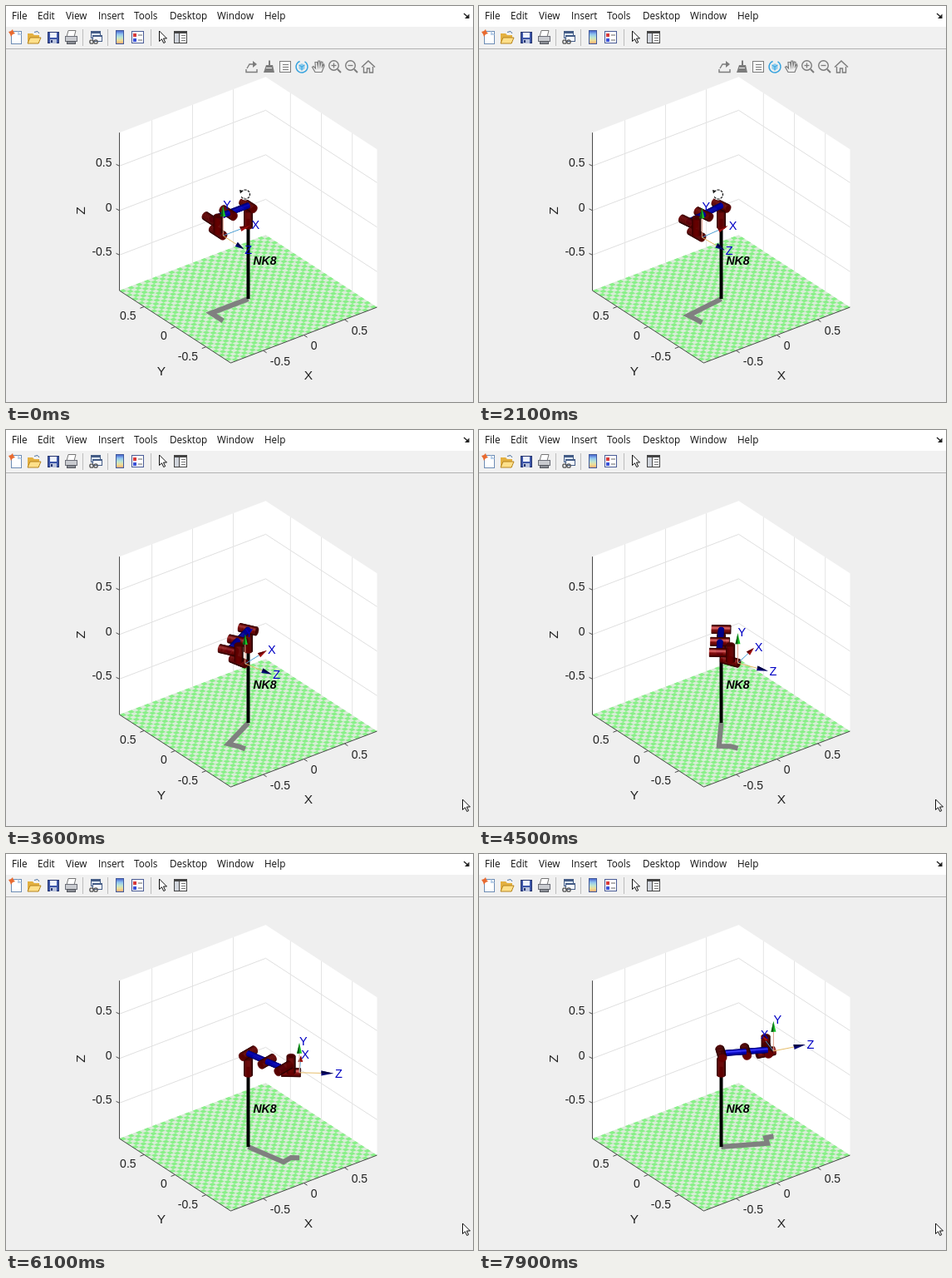
Write an HTML page with a canvas that moves like this. It is 562x476 px and loops after 8000 ms.

```html
<!DOCTYPE html>
<html lang="en">
<head>
<meta charset="utf-8">
<title>Robot arm plot</title>
<style>
html, body { margin: 0; width: 100%; height: 100%; overflow: hidden; background: #efefef; }
canvas { display: block; }
</style>
</head>
<body>
<canvas id="stage" width="562" height="476"></canvas>
<script>
const W = 562, H = 476, LOOP = 8000, STEP = 100;
const RAD = Math.PI / 180;
const SANS = '"Liberation Sans", Arial, sans-serif';
const UI = '"Open Sans", "Noto Sans", sans-serif';
const FLOOR = -0.9, TOP = 0.875, EDGE = 0.9;
const view = document.getElementById('stage').getContext('2d');
const still = document.createElement('canvas');
still.width = W;
still.height = H;
let g = still.getContext('2d');

// ---------- vectors and projection ----------
const project = ([x, y, z]) => [291.5 + 97.8 * x - 74.4 * y, 255.8 - 37.2 * x - 48.3 * y - 107 * z];
const add = (a, b, k = 1) => a.map((v, i) => v + b[i] * k);
const dot = (a, b) => a[0] * b[0] + a[1] * b[1] + a[2] * b[2];
const cross = (a, b) => [a[1] * b[2] - a[2] * b[1], a[2] * b[0] - a[0] * b[2], a[0] * b[1] - a[1] * b[0]];
const unit = a => a.map(v => v / Math.hypot(...a));
const heading = deg => [Math.cos(deg * RAD), Math.sin(deg * RAD), 0];
const UP = [0, 0, 1];
const EYE = unit([-0.531, -0.698, 0.48]);
const GLINT = unit([-0.43, -0.56, 0.74]);

// ---------- drawing helpers ----------
function trace(pts, close) {
  g.beginPath();
  pts.forEach(p => g.lineTo(p[0], p[1]));
  if (close) g.closePath();
}
function fill(pts, color) {
  trace(pts, true);
  g.fillStyle = color;
  g.fill();
}
function line(pts, color, width = 1) {
  trace(pts);
  g.strokeStyle = color;
  g.lineWidth = width;
  g.stroke();
}
function rect(x, y, w, h, color, edge) {
  g.fillStyle = color;
  g.fillRect(x, y, w, h);
  if (edge) {
    g.strokeStyle = edge;
    g.lineWidth = 1;
    g.strokeRect(x + 0.5, y + 0.5, w - 1, h - 1);
  }
}
function arc(x, y, r, color, width = 1, from = 0, to = 360) {
  g.beginPath();
  g.arc(x, y, r, from * RAD, to * RAD);
  g.strokeStyle = color;
  g.lineWidth = width;
  g.stroke();
}
function text(s, x, y, font, color = '#222', align = 'left') {
  g.font = font;
  g.fillStyle = color;
  g.textAlign = align;
  g.textBaseline = 'middle';
  g.fillText(s, x, y);
}
const line3 = (pts, color, width) => line(pts.map(project), color, width);
const fill3 = (pts, color) => fill(pts.map(project), color);

function pointer(x, y) {
  const shape = [[0, 0], [0, 12.5], [3, 9.8], [5.2, 14.5], [7.2, 13.6], [5, 9], [9, 9]];
  const pts = shape.map(p => [x + 0.5 + p[0], y + p[1]]);
  fill(pts, '#fff');
  trace(pts, true);
  g.strokeStyle = '#111';
  g.lineWidth = 1;
  g.stroke();
}

// ---------- window chrome ----------
function menuBar() {
  rect(0, 0, W, 25, '#fff');
  const items = { File: 7, Edit: 38, View: 72, Insert: 111, Tools: 154, Desktop: 197, Window: 254, Help: 311 };
  for (const name in items) text(name, items[name], 13, '11.7px ' + UI, '#111');
  line([[551, 9], [556, 13.5]], '#222', 1.4);
  fill([[557.5, 9.5], [557.5, 15], [552, 15]], '#222');
}

function toolBar() {
  rect(0, 25, W, 26, '#f1f1f1');
  rect(0, 51, W, 1, '#b2b2b2');
  for (const x of [92, 122, 174]) rect(x, 28, 1, 20, '#bdbdbd');
  // new
  rect(6, 30, 13, 16, '#fdfeff', '#6d8cb4');
  fill([[14, 30], [19, 35], [14, 35]], '#b9cfe8');
  fill([[3, 31], [6, 30], [8, 28], [9, 31], [11, 33], [8, 34], [6, 37], [5, 34]], '#e86a30');
  // open
  fill([[26, 33], [32, 33], [34, 35], [40, 35], [40, 45], [26, 45]], '#e3b040');
  fill([[29, 38], [42, 38], [39, 45], [26, 45]], '#ffe08a');
  line([[26, 45], [29, 38], [42, 38], [39, 45], [26, 45]], '#b58420');
  line([[34, 31.5], [38, 30.5], [40, 33]], '#4a6fa0');
  // save
  rect(50, 31, 14, 14, '#3d56a8', '#26356f');
  rect(53, 32, 8, 6, '#eef3ff');
  rect(53, 40, 8, 5, '#b9c3dd');
  rect(54, 41, 2, 3, '#26356f');
  // print
  fill([[75, 29], [84, 29], [82, 37], [73, 37]], '#fff');
  line([[73, 37], [75, 29.5], [84, 29.5], [82, 37]], '#777');
  rect(71, 36, 15, 7, '#c9cbd0', '#6c6f78');
  rect(73, 42, 11, 4, '#8b8e96', '#55585f');
  // link
  rect(102, 30, 12, 9, '#dfe9f7', '#445c86');
  rect(102, 30, 12, 3, '#445c86');
  rect(104, 35, 12, 8, '#f5f8fd', '#445c86');
  rect(104, 35, 12, 2, '#445c86');
  arc(103, 43, 2.2, '#555', 1.3);
  arc(108, 43, 2.2, '#555', 1.3);
  // colour bar
  const ramp = g.createLinearGradient(0, 30, 0, 46);
  ['#4a68d0', '#8fc4f0', '#bfe6d0', '#f4dc90', '#e89a70'].forEach((c, i) => ramp.addColorStop(i / 4, c));
  rect(132, 29, 10, 17, ramp, '#41599a');
  // legend
  rect(151, 30, 15, 15, '#fff', '#4a5c96');
  rect(153, 33, 4, 4, '#d83a3a');
  rect(153, 39, 4, 4, '#3a52d8');
  line([[159, 35], [164, 35]], '#666');
  line([[159, 41], [164, 41]], '#666');
  pointer(184, 30);
  // inspector
  rect(202, 30, 16, 15, '#fff', '#444');
  rect(202, 30, 16, 3, '#444');
  rect(203, 33, 5, 11, '#d0d4dc');
  rect(208, 33, 1, 12, '#444');
  for (const y of [35, 38, 41]) rect(211, y, 5, 1, '#777');
}

// ---------- plot box ----------
function plotBox() {
  const E = EDGE, ticks = [-0.5, 0, 0.5];
  fill3([[-E, E, FLOOR], [-E, E, TOP], [E, E, TOP], [E, -E, TOP], [E, -E, FLOOR], [E, E, FLOOR]], '#fff');
  for (const v of ticks) {
    line3([[-E, E, v], [E, E, v], [E, -E, v]], '#e0e0e0');
    line3([[v, E, FLOOR], [v, E, TOP]], '#e4e4e4');
    line3([[E, v, FLOOR], [E, v, TOP]], '#e4e4e4');
  }
  fill3([[-E, -E, FLOOR], [E, -E, FLOOR], [E, E, FLOOR], [-E, E, FLOOR]], '#daecd8');
  const n = 36, s = 2 * E / n;
  for (let i = 0; i < n; i++) {
    for (let j = 1 - i % 2; j < n; j += 2) {
      const x = -E + i * s, y = -E + j * s;
      fill3([[x, y, FLOOR], [x + s, y, FLOOR], [x + s, y + s, FLOOR], [x, y + s, FLOOR]], '#88f088');
    }
  }
  line3([[-E, E, TOP], [-E, E, FLOOR], [-E, -E, FLOOR], [E, -E, FLOOR]], '#4a4a4a');
  const font = '14px ' + SANS;
  for (const v of ticks) {
    line3([[v, -E, FLOOR], [v, -E - 0.055, FLOOR]], '#4a4a4a');
    line3([[-E, v, FLOOR], [-E - 0.05, v, FLOOR]], '#4a4a4a');
    const z = project([-E, E, v]);
    line([z, [z[0] - 4, z[1] - 2]], '#4a4a4a');
    text(v, z[0] - 9, z[1] - 3, font, '#222', 'right');
    const x = project([v, -E, FLOOR]), y = project([-E, v, FLOOR]);
    text(v, x[0] + 8.3, x[1] + 14, font);
    text(v, y[0] - 9.7, y[1] + 12, font, '#222', 'right');
  }
  text('X', 364, 444.5, '15.5px ' + SANS, '#222', 'center');
  text('Y', 187, 440, '15.5px ' + SANS, '#222', 'center');
  g.save();
  g.translate(90.5, 246);
  g.rotate(-Math.PI / 2);
  text('Z', 0, 0, '15.5px ' + SANS, '#222', 'center');
  g.restore();
}

// ---------- hover tools of the axes ----------
function axesTools(alpha) {
  if (alpha <= 0) return;
  const c = '#7c7c7c', y = 73;
  g.save();
  g.globalAlpha = alpha;
  line([[289, 76], [289, 79.5], [302, 79.5], [302, 76]], c, 1.4);
  line([[290, 75], [293, 70], [298, 70]], c, 1.4);
  fill([[297, 66], [302, 70], [297, 74]], c);
  line([[317, 65.5], [317, 71]], c, 2);
  fill([[313, 71], [321, 71], [323, 80], [310, 80]], c);
  rect(313, 74, 7, 1, '#efefef');
  rect(329, 66, 14, 14, '#f6f6f6', c);
  for (const k of [70, 73, 76]) rect(333, k, 7, 1, c);
  arc(356, y, 7, '#35a2de', 1.5, -60, 250);
  fill([[352.5, 71], [356, 69], [359.5, 71], [359.5, 75.5], [356, 77.5], [352.5, 75.5]], '#8cccee');
  line([[352.5, 71], [356, 73], [359.5, 71]], '#35a2de');
  line([[356, 73], [356, 77.5]], '#35a2de');
  trace([[372, 79.5], [368.5, 73.5], [370, 72.5], [372.5, 75], [372, 67.5], [374.5, 67.5], [375.3, 72],
    [375.8, 66], [377.6, 66], [378, 72], [379.2, 67], [381, 67.5], [380.5, 73], [382.5, 70], [383, 72], [380, 79.5]], true);
  g.strokeStyle = c;
  g.lineWidth = 1.2;
  g.stroke();
  for (const x of [394.5, 414.5]) {
    arc(x, 71.5, 5.8, c, 1.4);
    line([[x + 4.5, 76], [x + 8.5, 80]], c, 2);
    line([[x - 3, 71.5], [x + 3, 71.5]], c, 1.3);
  }
  line([[394.5, 68.5], [394.5, 74.5]], c, 1.3);
  line([[428, 73.5], [436, 66], [444, 73.5]], c, 1.5);
  line([[430.5, 73], [430.5, 80], [434.5, 80], [434.5, 75], [437.5, 75], [437.5, 80], [441.5, 80], [441.5, 73]], c, 1.4);
  g.restore();
}

// ---------- robot ----------
// keys: time in s, turn in degrees, turn speed
const TURN = [[0, 0, 0], [2.1, 8, 8], [3.6, 27.5, 20], [4.5, 50, 28], [5.3, 75.5, 32], [6.8, 124, 29.5], [8, 153, 18]];
function turnAt(t) {
  const i = Math.max(1, TURN.findIndex(k => k[0] >= t));
  const [t0, p0, v0] = TURN[i - 1], [t1, p1, v1] = TURN[i];
  const d = t1 - t0, u = (t - t0) / d, w = 1 - u;
  return w * w * ((1 + 2 * u) * p0 + u * d * v0) + u * u * ((3 - 2 * u) * p1 - w * d * v1);
}

function shade(n, blue) {
  const d = Math.max(0, dot(n, EYE)), s = Math.pow(Math.max(0, dot(n, GLINT)), 18);
  const main = 34 + 80 * d + 115 * s, rest = 100 * s;
  return blue ? `rgb(${rest * 0.7},${rest * 0.7},${main + 70})` : `rgb(${main},${rest},${rest})`;
}

function cylinder(mid, axis, half, r, blue) {
  const u = unit(cross(axis, Math.abs(axis[2]) > 0.9 ? [1, 0, 0] : UP)), w = cross(axis, u);
  const N = 32, a = add(mid, axis, half), b = add(mid, axis, -half);
  const normal = i => add(u.map(v => v * Math.cos(2 * Math.PI * i / N)), w, Math.sin(2 * Math.PI * i / N));
  const facet = (pts, n) => {
    const color = shade(n, blue);
    fill3(pts, color);
    g.strokeStyle = color;
    g.lineWidth = 0.5;
    g.stroke();
  };
  const ring = [];
  const front = dot(axis, EYE) > 0;
  for (let i = 0; i < N; i++) {
    const n = normal(i), m = normal(i + 1), c = normal(i + 0.5);
    ring.push(add(front ? a : b, n, r));
    if (dot(c, EYE) > 0) facet([add(a, n, r), add(a, m, r), add(b, m, r), add(b, n, r)], c);
  }
  facet(ring, front ? axis : axis.map(v => -v));
}

function arrow(from, dir, name, thin, cone) {
  const a = project(from), b = project(add(from, dir, 0.335)), base = project(add(from, dir, 0.215));
  const dx = b[0] - a[0], dy = b[1] - a[1], len = Math.hypot(dx, dy) || 1;
  const nx = -dy / len * 3, ny = dx / len * 3;
  line([a, base], thin);
  fill([[base[0] + nx, base[1] + ny], b, [base[0] - nx, base[1] - ny]], cone[0]);
  fill([base, b, [base[0] - nx, base[1] - ny]], cone[1]);
  const p = project(add(from, dir, 0.35));
  return () => text(name, p[0], p[1] + 1, '14.5px ' + SANS, '#0000c4');
}

function robot(t) {
  const turn = turnAt(t);
  const reach = heading(180 + turn), side = heading(270 + turn), tool = heading(-90 + turn * 0.49);
  const base = [0, 0, 0], shoulder = [0, 0, 0.15];
  const elbow = add(shoulder, reach, 0.2437), wrist = add(elbow, reach, 0.2133);
  const w2 = add(wrist, side, 0.1124), w3 = add(w2, UP, -0.093), tip = add(w3, tool, 0.082);

  const ground = p => [p[0], p[1], FLOOR];
  g.lineJoin = 'miter';
  line3([base, wrist, w2, tip].map(ground), '#808080', 6);
  line3([ground(base), base], '#000', 4);

  const joint = (mid, axis) => ({ mid, axis, half: 0.093, r: 0.041 });
  const link = (a, b) => ({ mid: add(a, b).map(v => v / 2), axis: reach, half: Math.hypot(...add(b, a, -1)) / 2, r: 0.026, blue: true });
  [joint(base, UP), joint(shoulder, side), joint(elbow, side), joint(wrist, side), joint(w2, UP), joint(w3, tool),
    link(shoulder, elbow), link(elbow, wrist)]
    .sort((p, q) => dot(p.mid, EYE) - dot(q.mid, EYE))
    .forEach(p => cylinder(p.mid, p.axis, p.half, p.r, p.blue));

  const labels = [
    arrow(tip, cross(UP, tool), 'X', '#4c9fd4', ['#a01010', '#5e0000']),
    arrow(tip, UP, 'Y', '#e0a08c', ['#18c428', '#0a5a14']),
    arrow(tip, tool, 'Z', '#e6bd6a', ['#0a0a78', '#000040'])
  ];
  text('NK8', 297.5, 307.5, 'italic bold 14px ' + SANS, '#000');
  labels.forEach(draw => draw());
}

// ---------- mouse ----------
function mouse(t) {
  const k = Math.min(1, Math.max(0, (t - 2.9) / 0.6)), e = k * k * (3 - 2 * k);
  const x = 288 + 261 * e, y = 226 + 218 * e;
  if (x > 440) return pointer(x, y);
  g.save();
  arc(x, y + 0.5, 5.5, '#fff', 3);
  g.setLineDash([3, 1.2]);
  arc(x, y + 0.5, 5.5, '#111', 1.2, -150, 150);
  g.restore();
  fill([[x - 7, y - 5], [x - 3, y - 4], [x - 6, y - 0.5]], '#111');
}

rect(0, 0, W, H, '#efefef');
menuBar();
toolBar();
plotBox();
g = view;

const start = performance.now();
function frame() {
  const ms = (performance.now() - start) % LOOP, t = Math.floor(ms / STEP) * STEP / 1000;
  g.drawImage(still, 0, 0);
  axesTools(Math.min(1, (3.3 - t) / 0.3));
  robot(t);
  mouse(t);
  requestAnimationFrame(frame);
}
frame();
</script>
</body>
</html>
```
